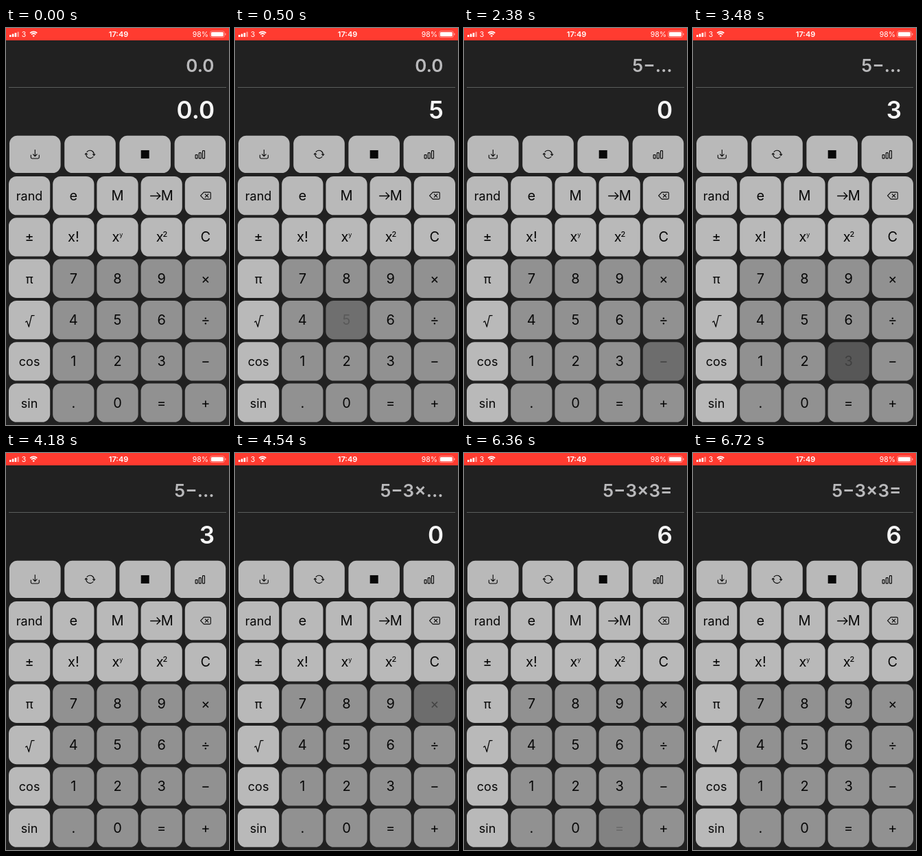
An HTML page with a canvas that plays this animation: 325x578 px, repeating every 8000 ms.

```html
<!DOCTYPE html>
<html lang="en">
<head>
<meta charset="utf-8">
<title>Calculator</title>
<style>
html, body { margin: 0; width: 100%; height: 100%; overflow: hidden; background: #212121; }
canvas { display: block; width: 325px; height: 578px; }
</style>
</head>
<body>
<canvas id="stage"></canvas>
<script>
const W = 325, H = 578, LOOP = 8000;
const FONT = 'Inter, "Liberation Sans", sans-serif';
const LIGHT = '#b9b9b9', GREY = '#919191', INK = '#080808';
const canvas = document.getElementById('stage');
const ctx = canvas.getContext('2d');
const ratio = window.devicePixelRatio || 1;
canvas.width = W * ratio;
canvas.height = H * ratio;

const KEYS = [
  ['rand', 'e', 'M', '→M', 'del'],
  ['±', 'x!', 'xy', 'x2', 'C'],
  ['π', '7', '8', '9', '×'],
  ['√', '4', '5', '6', '÷'],
  ['cos', '1', '2', '3', '−'],
  ['sin', '.', '0', '=', '+']
];

// Each tap shows new display lines and flashes its key.
const TAPS = [
  { at: 460, key: '5', top: '0.0', main: '5', len: 540 },
  { at: 2240, key: '−', top: '5−…', main: '0', len: 350 },
  { at: 3400, key: '3', top: '5−…', main: '3', len: 340 },
  { at: 4400, key: '×', top: '5−3×…', main: '0', len: 350 },
  { at: 5300, key: '3', top: '5−3×…', main: '3', len: 320 },
  { at: 6360, key: '=', top: '5−3×3=', main: '6', len: 350 }
];
const START = { at: 0, key: '', top: '0.0', main: '0.0', len: 0 };

function text(s, x, y, size, weight = 400, align = 'center') {
  ctx.font = `${weight} ${size}px ${FONT}`;
  ctx.textAlign = align;
  ctx.fillText(s, x, y);
}

function box(x, y, w, h, r) {
  ctx.beginPath();
  ctx.roundRect(x, y, w, h, r);
}

function line(...pts) {
  ctx.beginPath();
  for (let i = 0; i < pts.length; i += 2) ctx.lineTo(pts[i], pts[i + 1]);
  ctx.stroke();
}

function arc(x, y, r, from, to) {
  ctx.beginPath();
  ctx.arc(x, y, r, from, to);
  ctx.stroke();
}

// Icons and composite labels are drawn around their key's centre.
const GLYPHS = {
  save() {
    line(-2.8, 0, 0, 2.8, 2.8, 0);
    line(0, -6.5, 0, 2.5);
    ctx.beginPath();
    ctx.moveTo(-6, 1.2);
    ctx.lineTo(-6, 4.4);
    ctx.quadraticCurveTo(-6, 6, -4.4, 6);
    ctx.lineTo(4.4, 6);
    ctx.quadraticCurveTo(6, 6, 6, 4.4);
    ctx.lineTo(6, 1.2);
    ctx.stroke();
  },
  sync() {
    arc(0, 0, 5.7, -2.47, 0.15);
    arc(0, 0, 5.7, 0.67, 3.29);
    line(-7.3, 0, -5.7, -1.6, -4.1, 0);
    line(7.3, 0, 5.7, 1.6, 4.1, 0);
  },
  mark() {
    ctx.fillRect(-6, -6, 12, 12);
  },
  bars() {
    for (let i = 0; i < 3; i++) {
      box(-6.8 + i * 5.2, 0.7 - i * 3, 3, 5.2 + i * 3, 0.7);
      ctx.stroke();
    }
  },
  del() {
    ctx.beginPath();
    ctx.moveTo(-2.6, -5);
    ctx.lineTo(6, -5);
    ctx.quadraticCurveTo(7.4, -5, 7.4, -3.6);
    ctx.lineTo(7.4, 3.6);
    ctx.quadraticCurveTo(7.4, 5, 6, 5);
    ctx.lineTo(-2.6, 5);
    ctx.lineTo(-7.3, 0);
    ctx.closePath();
    ctx.stroke();
    line(-0.6, -2.3, 4, 2.3);
    line(-0.6, 2.3, 4, -2.3);
  },
  '→M'() {
    ctx.lineWidth = 1.4;
    line(-16, 0.3, -2, 0.3);
    line(-6.6, -4.3, -2, 0.3, -6.6, 4.9);
    text('M', 8, 7, 20);
  },
  xy() {
    text('x', -2.5, 7, 20);
    text('y', 5.4, 0, 9);
  },
  x2() {
    text('x', -2.5, 7, 20);
    text('2', 5.2, 0, 11, 500);
  },
  '√'() {
    ctx.lineWidth = 1.3;
    line(-5.5, 3, -3.6, 1.8, -0.8, 10, 3.2, -6.5, 7, -6.5);
  }
};

function key(label, x, y, w, h, fill, bodyAlpha = 1, inkAlpha = 1) {
  ctx.save();
  ctx.globalAlpha = bodyAlpha;
  ctx.fillStyle = fill;
  box(x, y, w, h, 11.5);
  ctx.fill();
  ctx.globalAlpha = inkAlpha;
  ctx.translate(x + w / 2, y + h / 2);
  ctx.fillStyle = ctx.strokeStyle = INK;
  ctx.lineWidth = 1.1;
  ctx.lineJoin = ctx.lineCap = 'round';
  if (GLYPHS[label]) GLYPHS[label]();
  else text(label, 0, 7, label.length > 2 || label === 'π' ? 18 : 20);
  ctx.restore();
}

function statusBar() {
  ctx.fillStyle = '#ff3b30';
  ctx.fillRect(0, 0, W, 18);
  ctx.fillStyle = ctx.strokeStyle = '#fff';
  for (let i = 0; i < 4; i++) {
    ctx.globalAlpha = i < 3 ? 1 : 0.45;
    const h = 3 + i * 1.5;
    box(5 + i * 3.8, 13 - h, 2.6, h, 0.6);
    ctx.fill();
  }
  ctx.globalAlpha = 1;
  text('3', 26, 13, 10.5);
  text('17:49', 164, 13, 11, 600);
  text('98%', 295, 13, 10.5, 400, 'right');

  ctx.lineWidth = 1.7;
  arc(40.2, 13, 7.6, -2.3, -0.84);
  arc(40.2, 13, 4.8, -2.3, -0.84);
  ctx.beginPath();
  ctx.moveTo(40.2, 13.3);
  ctx.arc(40.2, 13, 2.5, -2.3, -0.84);
  ctx.fill();

  ctx.lineWidth = 0.7;
  ctx.globalAlpha = 0.6;
  box(297.7, 4.6, 20.6, 9, 2.4);
  ctx.stroke();
  box(319.3, 7.6, 1.1, 3, 0.6);
  ctx.fill();
  ctx.globalAlpha = 1;
  box(299, 5.9, 17.8, 6.4, 1.4);
  ctx.fill();
}

// Body dips quickly then recovers; the label dims at once and returns.
function flash(t, len) {
  if (t >= len) return { body: 1, ink: 1 };
  const p = t / len, dip = 0.2;
  const q = (p - dip) / (1 - dip);
  return {
    body: p < dip ? 0.87 - 0.44 * p / dip : 1 - 0.57 * (1 - q) ** 2,
    ink: 0.2 + 0.8 * p ** 1.5
  };
}

function draw(t) {
  const tap = TAPS.filter(a => a.at <= t).pop() || START;
  const glow = flash(t - tap.at, tap.len);
  ctx.setTransform(ratio, 0, 0, ratio, 0, 0);
  ctx.fillStyle = '#212121';
  ctx.fillRect(0, 0, W, H);
  statusBar();

  ctx.fillStyle = '#b9b9bb';
  text(tap.top, 303.5, 64, 26, 600, 'right');
  ctx.fillStyle = '#f5f5f5';
  text(tap.main, 304, 132, 35, 600, 'right');
  ctx.fillStyle = '#5b5e5c';
  ctx.fillRect(4, 86, 317, 1);

  ['save', 'sync', 'mark', 'bars'].forEach((name, i) =>
    key(name, 5 + i * 80.2, 156.8, 74.6, 54.3, LIGHT));

  KEYS.forEach((row, r) => row.forEach((label, c) => {
    const fill = r > 1 && c > 0 ? GREY : LIGHT;
    const on = label === tap.key;
    key(label, 4 + c * 64.2, 216 + r * 60.3, 60.2, 56.3, fill,
      on ? glow.body : 1, on ? glow.ink : 1);
  }));
}

const began = performance.now();
function tick() {
  draw((performance.now() - began) % LOOP);
  requestAnimationFrame(tick);
}
tick();
</script>
</body>
</html>
```
